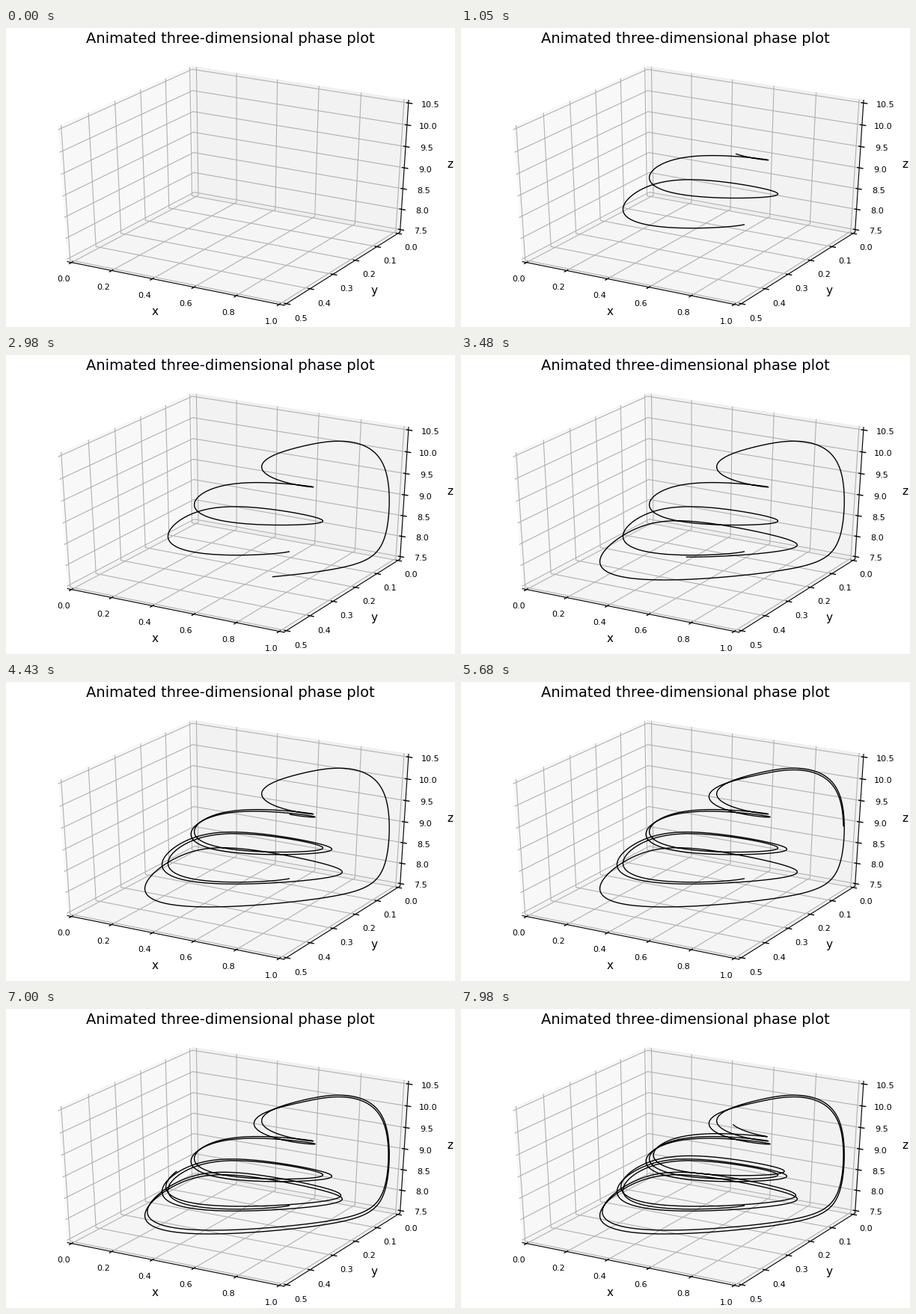
Recreate the animation shown at these times as a matplotlib script. Size 600x400 px, loop 8 s.

```python
import numpy as np
import matplotlib.pyplot as plt
from matplotlib.animation import FuncAnimation
from matplotlib.patches import Polygon

WIDTH, HEIGHT, DPI = 600, 400, 100
FRAMES, INTERVAL = 320, 25
STEPS = 20                      # integration steps per frame (one time unit)

LOW = np.array([0.0, 0.5, 7.5])     # the y axis runs backwards
HIGH = np.array([1.0, 0.0, 10.5])
ELEV, AZIM, DIST = np.radians(30), np.radians(-60), 10
CENTRE = np.array([307.9, 205.6])
SCALE = np.array([3204.0, -1976.0])

EDGE = 0.5 + 1 / 48             # half size of the padded box
DELTA = 1 / 12
TICK_PAD, LABEL_PAD = 0.0667, 0.145


def food_chain(s, a1=5.0, b1=3.0, a2=0.1, b2=2.0, d1=0.4, d2=0.01):
    """Hastings-Powell three-species food chain."""
    x, y, z = s
    f1 = a1 * x / (1 + b1 * x)
    f2 = a2 * y / (1 + b2 * y)
    return np.array([x * (1 - x) - f1 * y,
                     f1 * y - f2 * z - d1 * y,
                     f2 * z - d2 * z])


def integrate(start, count, h):
    path = np.empty((count, 3))
    path[0] = start
    for i in range(1, count):
        s = path[i - 1]
        k1 = food_chain(s)
        k2 = food_chain(s + h / 2 * k1)
        k3 = food_chain(s + h / 2 * k2)
        k4 = food_chain(s + h * k3)
        path[i] = s + h / 6 * (k1 + 2 * k2 + 2 * k3 + k4)
    return path


def project(points):
    """Perspective view of box coordinates (-0.5..0.5) in pixels."""
    u, v, w = np.asarray(points, float).T
    right = -np.sin(AZIM) * u + np.cos(AZIM) * v
    ahead = -np.cos(AZIM) * u - np.sin(AZIM) * v
    up = np.sin(ELEV) * ahead + np.cos(ELEV) * w
    depth = DIST + np.cos(ELEV) * ahead - np.sin(ELEV) * w
    return CENTRE + SCALE * np.column_stack([right / depth, up / depth])


def to_box(data):
    return (data - LOW) / (HIGH - LOW) - 0.5


fig = plt.figure(figsize=(WIDTH / DPI, HEIGHT / DPI), dpi=DPI, facecolor="white")
ax = fig.add_axes([0, 0, 1, 1])
ax.set_xlim(0, WIDTH)
ax.set_ylim(HEIGHT, 0)
ax.axis("off")


def stroke(points, color="black", lw=0.8):
    ax.plot(*project(points).T, color=color, lw=lw)


def label(point, text, size, va):
    x, y = project([point])[0]
    ax.text(x, y, text, fontsize=size, ha="center", va=va)


def pane(corners, grey):
    ax.add_patch(Polygon(project(corners), closed=False, alpha=0.5, lw=1,
                         facecolor=str(grey), edgecolor=str(grey)))


def draw_axis(index, name, ticks, rim, wall, tick_dir, decimals=1):
    """Axis line on the rim, its grid lines, ticks and labels.

    rim holds the signs of the box edge, wall the corners of a grid line.
    """
    rim = np.array(rim, float)

    def at(pos, signs, pad=0.0):
        point = np.array(signs, float) * (EDGE + pad)
        point[index] = pos
        return point

    stroke([at(-EDGE, rim), at(EDGE, rim)])
    label(at(0, rim, LABEL_PAD), name, 11, "center")

    places = (ticks - LOW[index]) / (HIGH[index] - LOW[index]) - 0.5
    for pos in places:
        stroke([at(pos, corner) for corner in wall], "#b0b0b0")
    for pos, value in zip(places, ticks):
        inner, outer = at(pos, rim), at(pos, rim)
        inner[tick_dir] -= 0.1 * DELTA * rim[tick_dir]
        outer[tick_dir] += 0.2 * DELTA * rim[tick_dir]
        stroke([inner, outer], lw=1)
        label(at(pos, rim, TICK_PAD), f"{value:.{decimals}f}", 8, "top")


E = EDGE
pane([(-E, -E, -E), (-E, E, -E), (-E, E, E), (-E, -E, E)], 0.95)
pane([(-E, E, -E), (E, E, -E), (E, E, E), (-E, E, E)], 0.9)
pane([(-E, -E, -E), (E, -E, -E), (E, E, -E), (-E, E, -E)], 0.925)

draw_axis(0, "x", np.linspace(0, 1, 6), (0, -1, -1),
          [(0, -1, -1), (0, 1, -1), (0, 1, 1)], tick_dir=1)
draw_axis(1, "y", np.linspace(0, 0.5, 6), (1, 0, -1),
          [(1, 0, -1), (-1, 0, -1), (-1, 0, 1)], tick_dir=0)
draw_axis(2, "z", np.linspace(7.5, 10.5, 7), (1, 1, 0),
          [(-1, -1, 0), (-1, 1, 0), (1, 1, 0)], tick_dir=0)

ax.text(WIDTH / 2, 19.5, "Animated three-dimensional phase plot",
        fontsize=14, ha="center", va="baseline")

orbit = project(to_box(integrate([0.7, 0.2, 8.0], FRAMES * STEPS, 1 / STEPS)))
curve, = ax.plot([], [], color="black", lw=1)


def update(frame):
    curve.set_data(*orbit[:frame * STEPS].T)
    return curve,


anim = FuncAnimation(fig, update, frames=FRAMES, interval=INTERVAL,
                     repeat=True, repeat_delay=0)
plt.show()
```
